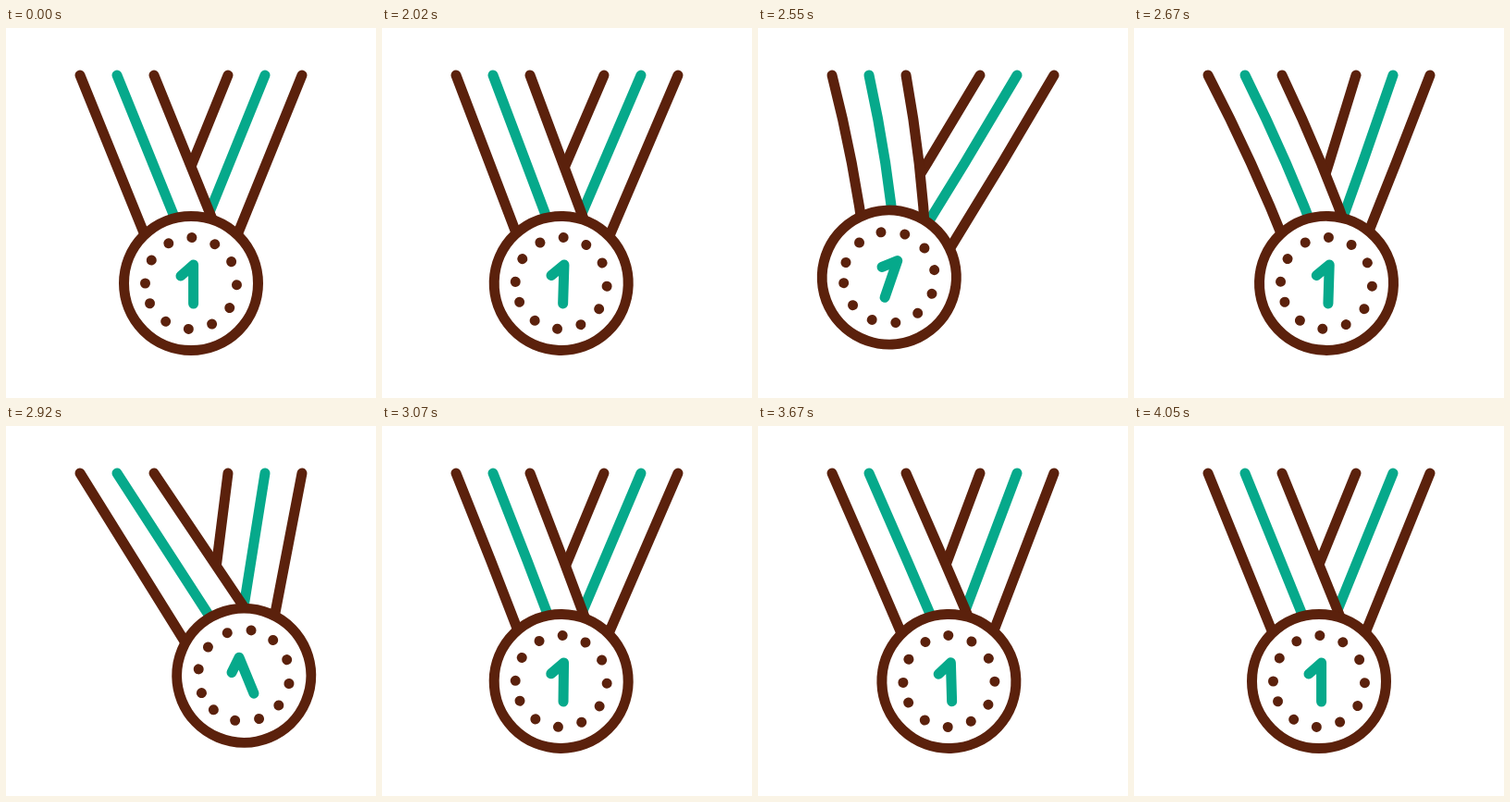
An HTML page without scripts that plays this animation: 400 px wide and 400 px high, repeating every 4100 ms.

```html
<!DOCTYPE html>
<html lang="en">
<head>
<meta charset="utf-8">
<title>Swinging medal</title>
<style>
  /* x: medal offset, a: medal angle, l / r: slope of each ribbon, lf / rf: spread of its stripes */
  @property --x { syntax: "<number>"; inherits: true; initial-value: 0; }
  @property --a { syntax: "<number>"; inherits: true; initial-value: 0; }
  @property --l { syntax: "<number>"; inherits: true; initial-value: .405; }
  @property --r { syntax: "<number>"; inherits: true; initial-value: -.405; }
  @property --lf { syntax: "<number>"; inherits: true; initial-value: 0; }
  @property --rf { syntax: "<number>"; inherits: true; initial-value: 0; }

  html, body { margin: 0; width: 100%; height: 100%; overflow: hidden; background: #fff; }

  svg {
    display: block;
    width: 400px;
    height: 400px;
    fill: none;
    stroke: #5b210c;
    stroke-width: 11;
    stroke-linecap: round;
    stroke-linejoin: round;
    animation: swing 4.1s linear infinite;
  }
  .teal { stroke: #06a98b; }

  .left { --k: var(--l); --fan: var(--lf); --mid: 120; --bend: bend-left; }
  .right { --k: var(--r); --fan: var(--rf); --mid: 280; --bend: bend-right; }

  .ribbon path {
    --i: 0;
    d: path("M0 0Q0 95 0 190");
    vector-effect: non-scaling-stroke;
    transform: matrix(1, 0, calc(var(--k) + var(--i) * var(--fan)), 1,
      calc(var(--mid) + var(--i) * 40), 51);
    animation: var(--bend) 4.1s ease-in-out infinite;
  }
  .ribbon .west { --i: -1; }
  .ribbon .east { --i: 1; }
  .ribbon .cloth { stroke: #fff; stroke-width: 70; stroke-linecap: butt; }

  .medal {
    transform: translate(calc(200px + var(--x) * 1px), calc(276px + var(--x) * var(--x) * -.0019px))
      rotate(calc(var(--a) * 1deg));
  }

  @keyframes swing {
    0% { --x: 0; --a: 0; --l: .405; --r: -.405; --lf: 0; --rf: 0; }
    48.78% { --x: 0; --a: 0; --l: .405; --r: -.405; --lf: 0; --rf: 0; animation-timing-function: cubic-bezier(.33, .4, .67, .87); }
    54.88% { --x: -61; --a: 17.4; --l: .133; --r: -.625; --lf: -.039; --rf: .011; animation-timing-function: cubic-bezier(.3, .6, .6, 1); }
    59.02% { --x: -68; --a: 20.5; --l: .11; --r: -.645; --lf: -.04; --rf: .011; animation-timing-function: cubic-bezier(.5, 0, .9, .6); }
    61.46% { --x: -66; --a: 21; --l: .12; --r: -.635; --lf: -.04; --rf: .01; animation-timing-function: cubic-bezier(.35, .1, .7, .64); }
    65.12% { --x: 7.4; --a: 2; --l: .432; --r: -.355; --lf: -.022; --rf: -.04; animation-timing-function: cubic-bezier(.35, .45, .65, 1); }
    68.78% { --x: 73; --a: -22.5; --l: .73; --r: -.075; --lf: .025; --rf: -.035; animation-timing-function: cubic-bezier(.4, 0, .7, .5); }
    71.22% { --x: 57.5; --a: -22.4; --l: .648; --r: -.158; --lf: .025; --rf: -.033; animation-timing-function: cubic-bezier(.33, .27, .6, 1); }
    77.8% { --x: -32; --a: 10; --l: .28; --r: -.53; --lf: -.02; --rf: 0; animation-timing-function: cubic-bezier(.36, 0, .64, .5); }
    81.71% { --x: 1.6; --a: 1.3; --l: .402; --r: -.4; --lf: -.02; --rf: -.014; animation-timing-function: cubic-bezier(.3, .5, .6, 1); }
    86.1% { --x: 22; --a: -6; --l: .5; --r: -.31; --lf: 0; --rf: -.01; animation-timing-function: ease-in-out; }
    92.68% { --x: -7; --a: 2; --l: .375; --r: -.435; --lf: 0; --rf: 0; animation-timing-function: ease-in-out; }
    98.54%, 100% { --x: 0; --a: 0; --l: .405; --r: -.405; --lf: 0; --rf: 0; }
  }

  @keyframes bend-left {
    0%, 48.78%, 71.22%, 92.68%, 100% { d: path("M0 0Q0 95 0 190"); }
    54.88% { d: path("M0 0Q8 95 0 190"); }
    65.12% { d: path("M0 0Q6 95 0 190"); }
    81.71% { d: path("M0 0Q4 95 0 190"); }
  }

  @keyframes bend-right {
    0%, 48.78%, 71.22%, 100% { d: path("M0 0Q0 95 0 190"); }
    54.88% { d: path("M0 0Q6 95 0 190"); }
    65.12% { d: path("M0 0Q1 95 0 190"); }
  }
</style>
</head>
<body>
<svg viewBox="0 0 400 400">
  <g class="ribbon right">
    <path class="west" d="M0 0V190"/>
    <path class="teal" d="M0 0V190"/>
    <path class="east" d="M0 0V190"/>
  </g>
  <g class="ribbon left">
    <path class="cloth" d="M0 0V190"/>
    <path class="west" d="M0 0V190"/>
    <path class="teal" d="M0 0V190"/>
    <path class="east" d="M0 0V190"/>
  </g>
  <g class="medal">
    <circle r="72.5" fill="#fff"/>
    <circle r="49.5" pathLength="360" stroke-dasharray=".01 30.34" transform="rotate(180)"/>
    <path class="teal" d="M-11 -8L2.6 -20V22"/>
  </g>
</svg>
</body>
</html>
```
